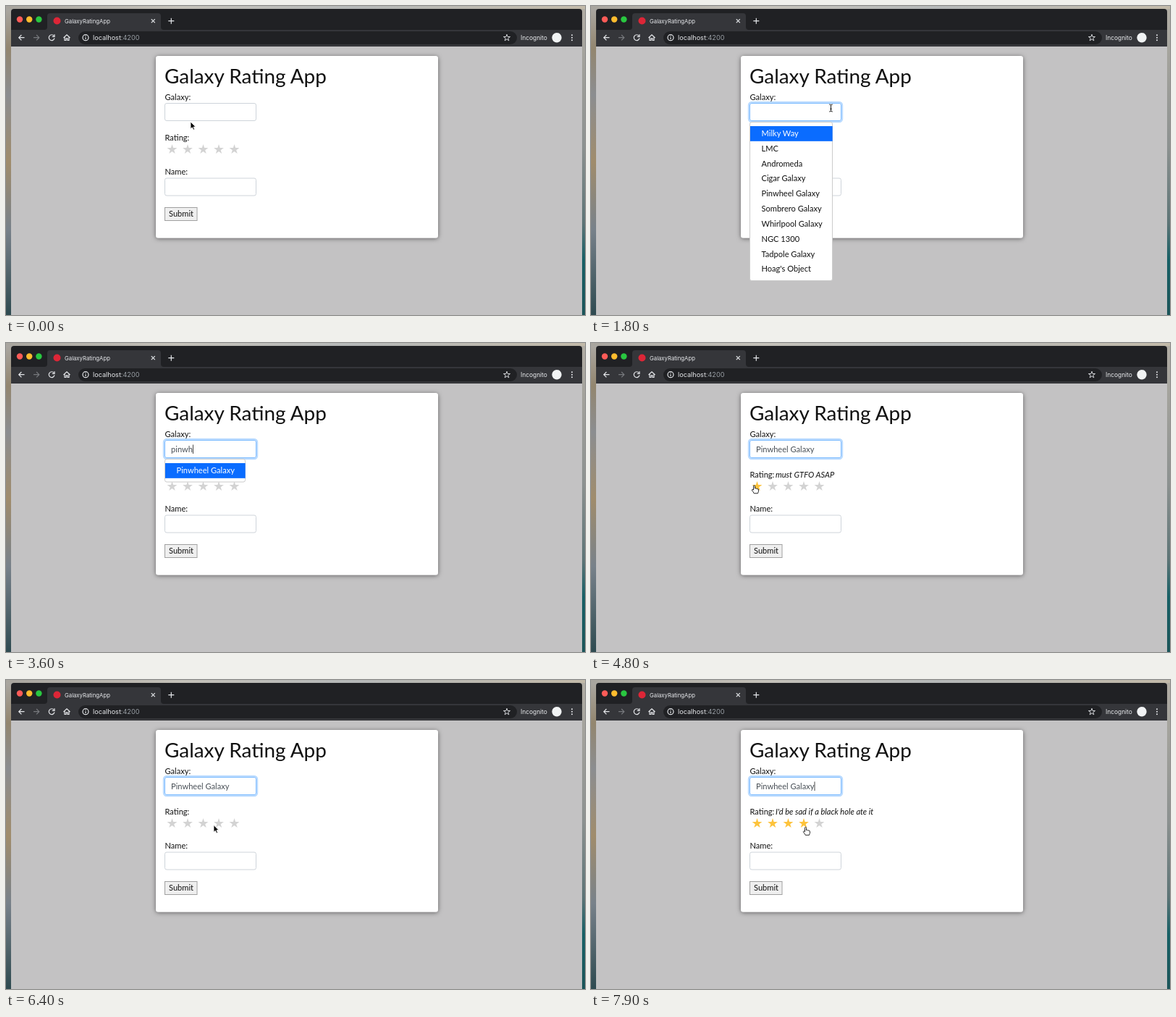
These frames come from a looping animation (800 by 427 pixels, 8 s). An HTML page:

```html
<!DOCTYPE html>
<html lang="en">
<head>
<meta charset="utf-8">
<title>Galaxy Rating App</title>
<style>
  html, body { margin: 0; width: 100%; height: 100%; overflow: hidden; background: #c3c2c3; }
  svg { display: block; width: 100vw; height: 100vh; }
  text { font-family: Lato, "Open Sans", sans-serif; font-size: 11.1px; fill: #111; white-space: pre; }
  .ui text { font-family: Inter, Roboto, sans-serif; fill: #e8eaed; }
  .icon { fill: none; stroke: #e4e6e9; stroke-width: 1.2; }
  .dim { stroke: #77797d; }
  .field { fill: #fff; stroke: #ced4da; }
  .focus { stroke: #80bdff; }
  #ring { fill: none; stroke: #007bff; stroke-opacity: .27; stroke-width: 2.4; }
  #typed { fill: #495057; }
  #note { font-style: italic; }
  .star { fill: #d3d3d3; }
  .star.on { fill: #fdc33c; }
  #menu text.active { fill: #fff; }
</style>
</head>
<body>
<svg viewBox="0 0 800 427" preserveAspectRatio="none">
  <defs>
    <linearGradient id="left" x2="0" y2="1">
      <stop offset="0" stop-color="#a9a6a0"/>
      <stop offset=".13" stop-color="#93866f"/>
      <stop offset=".28" stop-color="#8b8d90"/>
      <stop offset=".5" stop-color="#a08c6c"/>
      <stop offset=".72" stop-color="#78818a"/>
      <stop offset="1" stop-color="#2e4a50"/>
    </linearGradient>
    <linearGradient id="right" x2="0" y2="1">
      <stop offset="0" stop-color="#b1ada4"/>
      <stop offset=".45" stop-color="#8c9190"/>
      <stop offset=".7" stop-color="#5d7476"/>
      <stop offset=".82" stop-color="#176066"/>
      <stop offset="1" stop-color="#1c5559"/>
    </linearGradient>
    <linearGradient id="top">
      <stop offset="0" stop-color="#a8a59e"/>
      <stop offset=".3" stop-color="#c4c1b9"/>
      <stop offset=".6" stop-color="#b5b8b8"/>
      <stop offset="1" stop-color="#c2baa9"/>
    </linearGradient>
    <filter id="shade" x="-10%" y="-10%" width="120%" height="120%">
      <feDropShadow dx="0" dy="1" stdDeviation="3.2" flood-color="#000" flood-opacity=".5"/>
    </filter>
  </defs>

  <rect width="800" height="427" fill="url(#top)"/>
  <rect y="4" width="8" height="423" fill="url(#left)"/>
  <rect x="795" y="4" width="5" height="423" fill="url(#right)"/>

  <g class="ui">
    <path d="M7 427V8q0-4 4-4H792q4 0 4 4V427Z" fill="#c3c2c3"/>
    <path d="M7 56V8q0-4 4-4H792q4 0 4 4V56Z" fill="#202124"/>
    <path d="M7 33H53q4 0 4-4V14q0-4 4-4H210q4 0 4 4V29q0 4 4 4H796V56H7Z" fill="#35363a"/>
    <rect x="100" y="35" width="606" height="18" rx="9" fill="#202124"/>
    <circle cx="19" cy="18.5" r="4.2" fill="#fc5b57"/>
    <circle cx="32.2" cy="18.5" r="4.2" fill="#fdbc2e"/>
    <circle cx="45.4" cy="18.5" r="4.2" fill="#29c740"/>
    <circle cx="70.5" cy="20.5" r="5" fill="#dd2637"/>
    <text x="81" y="23.5" style="font-size:7.75px">GalaxyRatingApp</text>
    <text x="120" y="47" style="font-size:9.1px">localhost<tspan fill="#9aa0a6">:4200</tspan></text>
    <text x="711" y="46.8" style="font-size:8.4px">Incognito</text>
    <circle cx="761" cy="43.7" r="6.7" fill="#f1f3f4"/>
    <g class="icon">
      <path d="M200.8 18.2l5 5m0-5l-5 5M224.3 20.7h8m-4-4v8"/>
      <path d="M25.5 43.7H17.7m3.7-3.7l-3.7 3.7 3.7 3.7"/>
      <path class="dim" d="M38 43.7h7.8m-3.7-3.7l3.7 3.7-3.7 3.7"/>
      <path d="M66.2 41.2A3.9 3.9 0 1 0 67 44.4M67 39.2V42.3H63.8"/>
      <path d="M79.5 44L84 39.8 88.500 44M81 43V47.500H83V44.800H85V47.500H87V43"/>
      <circle cx="110" cy="43.7" r="4"/>
      <path d="M110 43.200V46M110 41.200V42.300"/>
      <path id="mark" stroke-width=".9"/>
    </g>
    <g fill="#e4e6e9">
      <circle cx="782" cy="40.2" r="1"/><circle cx="782" cy="43.7" r="1"/><circle cx="782" cy="47.200" r="1"/>
    </g>
  </g>

  <rect x="207" y="69" width="390" height="251.500" rx="3.500" fill="#fff" filter="url(#shade)"/>
  <text x="219" y="106.800" style="font-size:27.9px">Galaxy Rating App</text>
  <text x="219.500" y="129.800">Galaxy:</text>
  <text x="219.500" y="185.800">Rating:</text>
  <text x="219.500" y="233.300">Name:</text>
  <text id="note" x="255" y="185.800"></text>
  <g id="stars"></g>

  <rect id="ring" x="218" y="133" width="129" height="27" rx="4"/>
  <rect id="field" class="field" x="219.500" y="134.500" width="126" height="24" rx="2.500"/>
  <text id="typed" x="228" y="150.700"></text>
  <path id="caret" stroke="#333" stroke-width=".9"/>
  <rect class="field" x="219.500" y="238" width="126" height="24" rx="2.500"/>
  <rect x="219.500" y="278.500" width="44.500" height="18" fill="#efefef" stroke="#a0a0a0"/>
  <text x="225" y="291">Submit</text>

  <g id="menu"></g>

  <g id="pointer">
    <path id="arrow" d="M0 0V9.800L2.300 7.700 3.900 11.200 5.500 10.500 4 7.100H7Z" fill="#000" stroke="#fff" stroke-width=".8"/>
    <path id="beam" d="M-2.200-5Q0-5 0-3.700Q0-5 2.200-5M0-3.700V3.700M-2.200 5Q0 5 0 3.700Q0 5 2.200 5M-1.200 1.200H1.200" fill="none" stroke="#111" stroke-width="1"/>
    <path id="hand" d="M-1 .8Q-1-.3 0-.3T1 .8V4Q2 3.200 2.800 4.300Q3.900 3.700 4.500 4.800Q6 4.400 6 6V7.800Q5.600 9 5 10.800H-.3Q-1 9-2.700 7.200Q-3.600 5.800-2.600 5.300Q-1.700 5.100-1 6.200Z" fill="#fff" stroke="#111" stroke-width=".9"/>
  </g>
</svg>
<script>
const $ = id => document.getElementById(id);
const show = (id, on) => { $(id).style.display = on ? '' : 'none'; };

const galaxies = ['Milky Way', 'LMC', 'Andromeda', 'Cigar Galaxy', 'Pinwheel Galaxy',
  'Sombrero Galaxy', 'Whirlpool Galaxy', 'NGC 1300', 'Tadpole Galaxy', "Hoag's Object"];
const notes = ['', 'must GTFO ASAP', 'meh', "it's ok",
  "I'd be sad if a black hole ate it", '10/10 would write a glowing review'];

// time, pointer x, pointer y
const path = [[0, 255, 160], [600, 278, 165], [800, 278, 165], [1300, 331.5, 141],
  [4000, 331.5, 141], [4700, 227, 197], [4800, 225.5, 197], [5200, 231, 199],
  [5700, 252, 199], [6100, 273, 199], [6400, 287, 200.5], [6700, 293, 201],
  [7000, 295, 202], [7400, 315, 202], [7600, 313, 202], [7900, 296.5, 203.5]];
const typing = [[0, ''], [2600, 'p'], [2800, 'pi'], [3000, 'pin'], [3300, 'pinw'],
  [3500, 'pinwh'], [3800, 'Pinwheel Galaxy']];

const starX = i => 229.5 + 21.5 * i;

function starPath(cx, cy, r) {
  let d = '';
  for (let k = 0; k < 10; k++) {
    const a = Math.PI * (k / 5 - .5), q = k % 2 ? r * .39 : r;
    d += (k ? 'L' : 'M') + (cx + q * Math.cos(a)).toFixed(2) + ' ' + (cy + q * Math.sin(a)).toFixed(2);
  }
  return d + 'Z';
}

function pointerAt(t) {
  const i = path.findIndex(p => p[0] > t);
  if (i < 0) return path[path.length - 1].slice(1);
  const [t0, x0, y0] = path[i - 1], [t1, x1, y1] = path[i];
  let u = (t - t0) / (t1 - t0);
  u = u * u * (3 - 2 * u);
  return [x0 + (x1 - x0) * u, y0 + (y1 - y0) * u];
}

function caretOn(t) {
  if (t < 1500) return false;
  if (t < 2600) return t < 1800 || t >= 2300;
  if (t < 3900) return true;
  return (t - 3900) % 1000 < 500;
}

function menuFor(list) {
  const row = 20.83, right = list.length > 1 ? 333.5 : 330.5;
  const w = right - 219.5;
  let s = `<rect x="219.5" y="160.5" width="${w}" height="${list.length * row + 10.7}" rx="2.5" fill="#fff" stroke="#ccc"/>`
    + `<rect x="220" y="166" width="${w - .3}" height="${row}" fill="#0a6cff"/>`;
  list.forEach((name, i) => {
    s += `<text x="235.5" y="${179.9 + i * row}"${i ? '' : ' class="active"'}>${name}</text>`;
  });
  return s;
}

$('mark').setAttribute('d', starPath(692, 44, 4.8));
$('stars').innerHTML = notes.slice(1).map((_, i) =>
  `<path class="star" d="${starPath(starX(i), 198.3, 7.2)}"/>`).join('');
const stars = [...$('stars').children];
let lastList = null;

function draw(t) {
  const text = typing.filter(k => k[0] <= t).pop()[1];
  const focused = t >= 1500;
  show('ring', focused);
  $('field').classList.toggle('focus', focused);
  $('typed').textContent = text;
  const cx = 228.5 + (text ? $('typed').getComputedTextLength() : 0);
  $('caret').setAttribute('d', `M${cx} 140.500V153`);
  show('caret', caretOn(t));

  const open = t >= 1600 && t < 3800;
  const list = open ? galaxies.filter(g => g.toLowerCase().includes(text)) : [];
  const key = list.join();
  if (key !== lastList) {
    $('menu').innerHTML = open ? menuFor(list) : '';
    lastList = key;
  }

  const [x, y] = pointerAt(t);
  const hover = y > 190 && y < 206 ? stars.findIndex((_, i) => Math.abs(x - starX(i)) < 6.5) + 1 : 0;
  stars.forEach((s, i) => s.classList.toggle('on', i < hover));
  $('note').textContent = notes[hover];

  const inField = x > 219 && x < 346 && y > 134 && y < 159;
  show('pointer', t < 2600 || t >= 4000);
  $('pointer').setAttribute('transform', `translate(${x} ${y})`);
  show('hand', hover > 0);
  show('beam', inField);
  show('arrow', !hover && !inField);
}

const start = performance.now();
function tick() {
  const t = (performance.now() - start) % 8000;
  draw(Math.floor(t / 100) * 100);
  requestAnimationFrame(tick);
}
tick();
</script>
</body>
</html>
```
